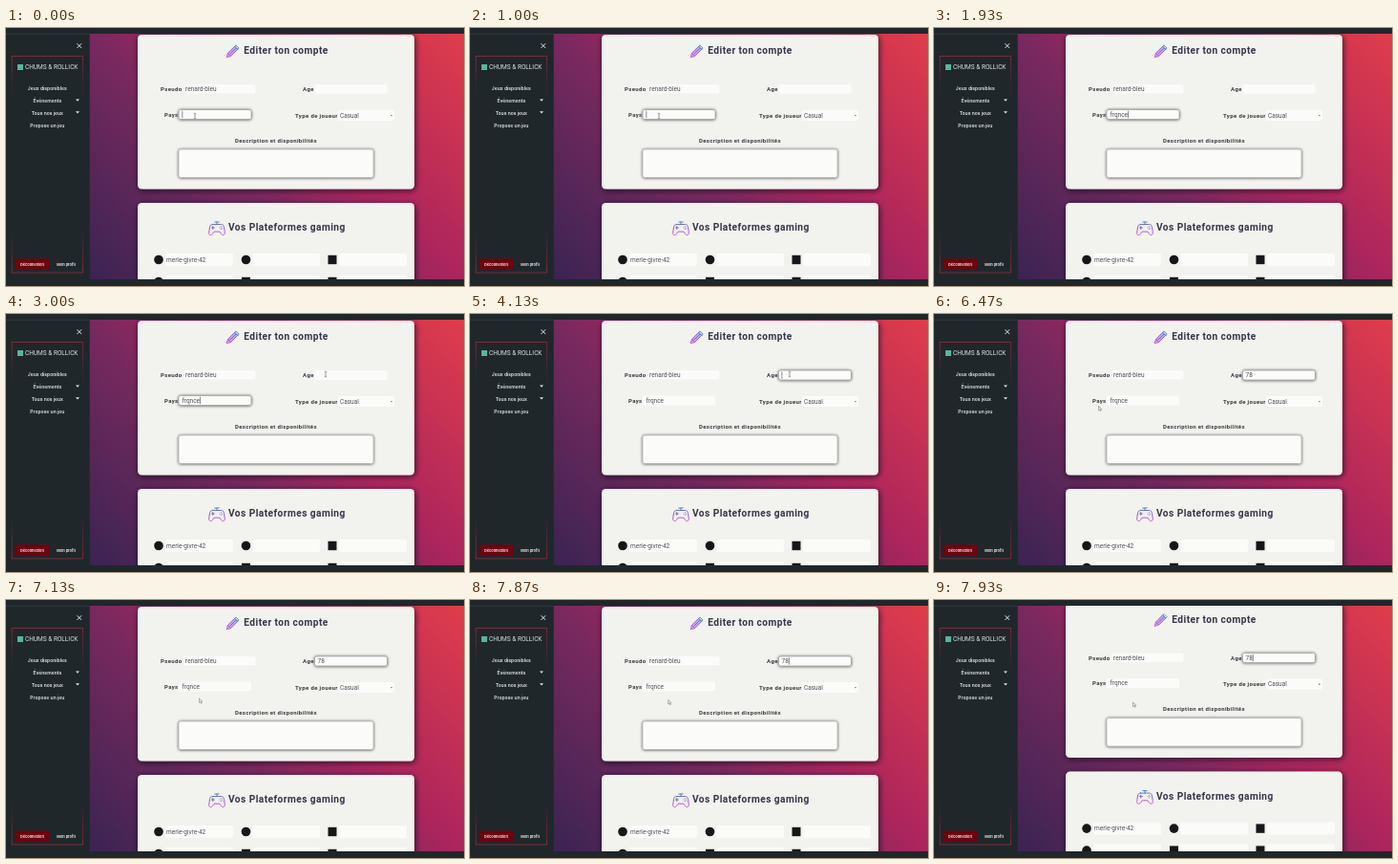
An HTML page that plays this animation: 480 by 270 pixels, repeating every 8 s.

```html
<!DOCTYPE html>
<html lang="fr">
<head>
<meta charset="utf-8">
<style>
  html, body { margin: 0; width: 100%; height: 100%; overflow: hidden; background: #20272a; }
  svg { display: block; width: 100vw; height: 100vh; }
  text { white-space: pre; }
  .title { font: 700 10.2px Roboto, sans-serif; letter-spacing: .43px; fill: #35364a; }
  .label { font: 700 6px Roboto, sans-serif; letter-spacing: .36px; fill: #37383f; }
  .value { font: 400 6.5px Roboto, sans-serif; fill: #505156; }
  .brand { font: 400 6.5px Roboto, sans-serif; fill: #dfe2e3; }
  .menu { font: 600 5px Inter, sans-serif; fill: #e4e7e8; text-anchor: middle; }
  .button { font: 700 3.9px Inter, sans-serif; fill: #e8e4e4; text-anchor: middle; }
</style>
</head>
<body>
<svg viewBox="0 0 480 270">
  <defs>
    <linearGradient id="sky" gradientUnits="userSpaceOnUse" x1="121.5" y1="297" x2="446" y2="-28">
      <stop offset="0" stop-color="#3a2452"/>
      <stop offset=".4" stop-color="#7a295f"/>
      <stop offset=".6" stop-color="#ac255d"/>
      <stop offset="1" stop-color="#e03d4b"/>
    </linearGradient>
    <linearGradient id="neon" gradientUnits="userSpaceOnUse" x1="0" y1="-8" x2="0" y2="7">
      <stop offset="0" stop-color="#3f7fc4"/>
      <stop offset=".5" stop-color="#7a52c8"/>
      <stop offset="1" stop-color="#d04fd0"/>
    </linearGradient>
    <linearGradient id="frame" x1="0" y1="0" x2="0" y2="1">
      <stop offset="0" stop-color="#a03048" stop-opacity=".85"/>
      <stop offset=".13" stop-color="#a03048" stop-opacity=".2"/>
      <stop offset=".2" stop-color="#a03048" stop-opacity="0"/>
      <stop offset=".8" stop-color="#a03048" stop-opacity="0"/>
      <stop offset="1" stop-color="#a03048" stop-opacity=".85"/>
    </linearGradient>
    <filter id="cardShadow" x="-10%" y="-10%" width="120%" height="120%">
      <feDropShadow dx="1" dy="1.5" stdDeviation="3.2" flood-color="#140a1c" flood-opacity=".75"/>
    </filter>
    <filter id="fieldShadow" x="-10%" y="-50%" width="120%" height="200%">
      <feDropShadow dx="0" dy=".3" stdDeviation="1.4" flood-color="#000" flood-opacity=".75"/>
    </filter>
    <clipPath id="view"><rect x="87.500" y="6" width="392.500" height="257"/></clipPath>
  </defs>

  <rect width="480" height="270" fill="#20272a"/>
  <rect y="5.800" width="87.500" height=".7" fill="#36444b"/>

  <g clip-path="url(#view)">
    <rect x="87.500" y="6" width="392.500" height="257" fill="url(#sky)"/>
    <g id="page">
      <g fill="#f2f2ee" filter="url(#cardShadow)">
        <rect x="138" y="7" width="290" height="161.500" rx="4.500"/>
        <rect x="138" y="183" width="290" height="120" rx="4.500"/>
      </g>
      <g id="fields"></g>

      <g transform="translate(237 25) rotate(45) scale(.92)" fill="none" stroke="url(#neon)" stroke-width=".9" stroke-linejoin="round">
        <path d="M-2.400-6.500h4.800v11L0 9l-2.400-4.500z" fill="#c9a8ea"/>
        <path d="M-2.400-8.500h4.800v2h-4.800zM0-6v10M-2.400 4.500h4.800"/>
      </g>
      <g transform="translate(221 210)" fill="none" stroke="url(#neon)" stroke-width=".9" stroke-linecap="round" stroke-linejoin="round">
        <path d="M-4.500-4.500h9c2 0 2.600 1 3 3L8.300 4c.3 3-2.400 3.800-4 1.200L3 3.200h-6L-4.300 5.200c-1.600 2.600-4.300 1.800-4-1.200l.8-5.500c.4-2 1-3 3-3z"/>
        <path d="M0-4.500v-2.500M-2.200-7h4.400M-4.200-2.500v3M-5.700-1h3M3-.9h.1M5.500-.9h.1M4.300-2.200h.1M4.300.4h.1"/>
      </g>

      <text class="title" x="249.300" y="27.200">Editer ton compte</text>
      <text class="title" x="233" y="212.200">Vos Plateformes gaming</text>
      <text class="label" x="162" y="66">Pseudo</text>
      <text class="label" x="311" y="66">Age</text>
      <text class="label" x="166" y="92.500">Pays</text>
      <text class="label" x="303" y="93.500">Type de joueur</text>
      <text class="label" x="240" y="119.800">Description et disponibilités</text>
      <text class="value" x="188" y="66">renard-bleu</text>
      <text class="value" x="350" y="93.700">Casual</text>
      <text class="value" x="168" y="244.700">merle-givre-42</text>
      <text class="value" id="country" x="184.500" y="92.500"></text>
      <text class="value" id="age" x="326.500" y="66"></text>
      <path d="M402.800 91.200l1.200 1.400 1.200-1.400z" fill="#666"/>
      <g id="platforms" fill="#17171a"></g>
      <rect id="caret" width=".6" height="7.500" fill="#444"/>
    </g>
  </g>

  <rect x="6.200" y="29.500" width="74.300" height="226.500" fill="none" stroke="url(#frame)" stroke-width=".8"/>
  <path d="M74.500 16.300l4.600 4.600m0-4.600l-4.600 4.600" stroke="#e8eaea" stroke-width="1"/>
  <rect x="12" y="38" width="6" height="6" fill="#58b5a2"/>
  <text class="brand" x="20" y="43.400">CHUMS &amp; ROLLICK</text>
  <g class="menu">
    <text x="43.300" y="64.600">Jeux disponibles</text>
    <text x="43.300" y="77.700">Événements</text>
    <text x="43.300" y="90.700">Tous nos jeux</text>
    <text x="43.300" y="103.700">Propose un jeu</text>
  </g>
  <path d="M73 74.500h4L75 76.700zm0 12.800h4L75 89.500z" fill="#e4e7e8"/>
  <rect x="9.500" y="241.500" width="36.500" height="11.500" rx="1.800" fill="#6c040f"/>
  <text class="button" x="27.400" y="248.500">Déconnexion</text>
  <text class="button" x="63" y="248.600">Mon profil</text>

  <g id="mouse">
    <path id="arrow" d="M0 0v4.500l1.100-.9.8 1.600.8-.4-.8-1.600 1.400-.1z" fill="#f4f4f2" stroke="#666" stroke-width=".5"/>
    <path id="beam" d="M-1.200-2.700h.8l.4.400.4-.4h.8M0-2.300v4.600M-1.200 2.700h.8l.4-.4.4.4h.8" fill="none" stroke="#555" stroke-width=".6"/>
  </g>
</svg>

<script>
const LOOP = 8000;
const $ = id => document.getElementById(id);
const show = (el, on) => el.setAttribute('visibility', on ? 'visible' : 'hidden');

function add(parent, tag, attrs) {
  const el = document.createElementNS('http://www.w3.org/2000/svg', tag);
  for (const key in attrs) el.setAttribute(key, attrs[key]);
  return parent.appendChild(el);
}

// Inputs: x, y, width, height
const boxes = {
  pseudo: [186, 59, 75.5, 9.5],
  age: [323.5, 59, 76, 10],
  country: [181, 85.5, 76, 10],
  type: [348, 86, 59, 11],
  about: [181, 127, 204, 29.5]
};
const fields = {};
for (const [name, [x, y, width, height]] of Object.entries(boxes)) {
  fields[name] = add($('fields'), 'rect', { x, y, width, height, rx: 2, fill: '#fbfbfa' });
}

function setFocus(name, on) {
  const attrs = on
    ? { filter: 'url(#fieldShadow)', stroke: '#8c8d90', 'stroke-width': .6 }
    : { filter: 'none', stroke: 'none' };
  for (const key in attrs) fields[name].setAttribute(key, attrs[key]);
}
setFocus('about', true);
fields.about.setAttribute('stroke', '#a5a5a5');

[[160, 167], [251.5, 258], [342, 349]].forEach(([cx, x], col) => {
  for (const cy of [242.5, 265.5]) {
    add($('fields'), 'rect', { x, y: cy - 6.5, width: 71, height: 13, rx: 2, fill: '#fbfbfa' });
    const round = col === 0 || (col === 1 && cy < 250);
    if (round) add($('platforms'), 'circle', { cx, cy, r: 4.8 });
    else add($('platforms'), 'rect', { x: cx - 4.5, y: cy - 4.7, width: 9, height: 9.4 });
  }
});

const countryKeys = [1200, 1330, 1530, 1670, 1800, 1930];
const ageKeys = [4300, 4530];
const FOCUS_AGE = 3130;

// Mouse stops: time, x, y
const path = [
  [0, 198, 92], [2270, 198, 92], [2650, 262, 76], [3000, 335, 63],
  [5470, 335, 63], [5850, 262, 88], [6270, 174, 98], [6450, 172.5, 96.5],
  [6670, 172.5, 96.5], [7200, 207, 104], [7530, 207, 104], [7870, 207.7, 104.5], [7930, 208.5, 107]
];

function mouseAt(t) {
  const i = path.findIndex(p => p[0] > t);
  if (i < 0) return path[path.length - 1].slice(1);
  const [t0, x0, y0] = path[i - 1], [t1, x1, y1] = path[i];
  const u = (t - t0) / (t1 - t0);
  return [x0 + (x1 - x0) * u, y0 + (y1 - y0) * u];
}

const typed = (word, keys, t) => word.slice(0, keys.filter(k => k <= t).length);
const overField = (px, py) => Object.values(boxes).some(([x, y, w, h]) =>
  px >= x && px <= x + w && py >= y && py <= y + h);

function draw(t) {
  const onAge = t >= FOCUS_AGE;
  setFocus('age', onAge);
  setFocus('country', !onAge);

  $('country').textContent = typed('frqnce', countryKeys, t);
  $('age').textContent = typed('78', ageKeys, t);

  // The caret restarts its blink on each key or click
  const lastInput = Math.max(...[0, ...countryKeys, FOCUS_AGE, ...ageKeys].filter(k => k <= t));
  const active = onAge ? $('age') : $('country');
  const width = active.textContent ? active.getComputedTextLength() : 0;
  $('caret').setAttribute('x', +active.getAttribute('x') + width + .1);
  $('caret').setAttribute('y', onAge ? 60.2 : 86.7);
  show($('caret'), Math.floor((t - lastInput) / 500) % 2 === 0);

  const scroll = t >= 7930 ? -3.4 : 0;
  $('page').setAttribute('transform', `translate(0 ${scroll})`);

  const [x, y] = mouseAt(t);
  const hidden = (t >= 1200 && t < 2270) || (t >= 4300 && t < 5470);
  const beam = overField(x, y - scroll);
  $('mouse').setAttribute('transform', `translate(${x} ${y})`);
  show($('arrow'), !hidden && !beam);
  show($('beam'), !hidden && beam);
}

const start = performance.now();
function tick() {
  draw((performance.now() - start) % LOOP);
  requestAnimationFrame(tick);
}
tick();
</script>
</body>
</html>
```
